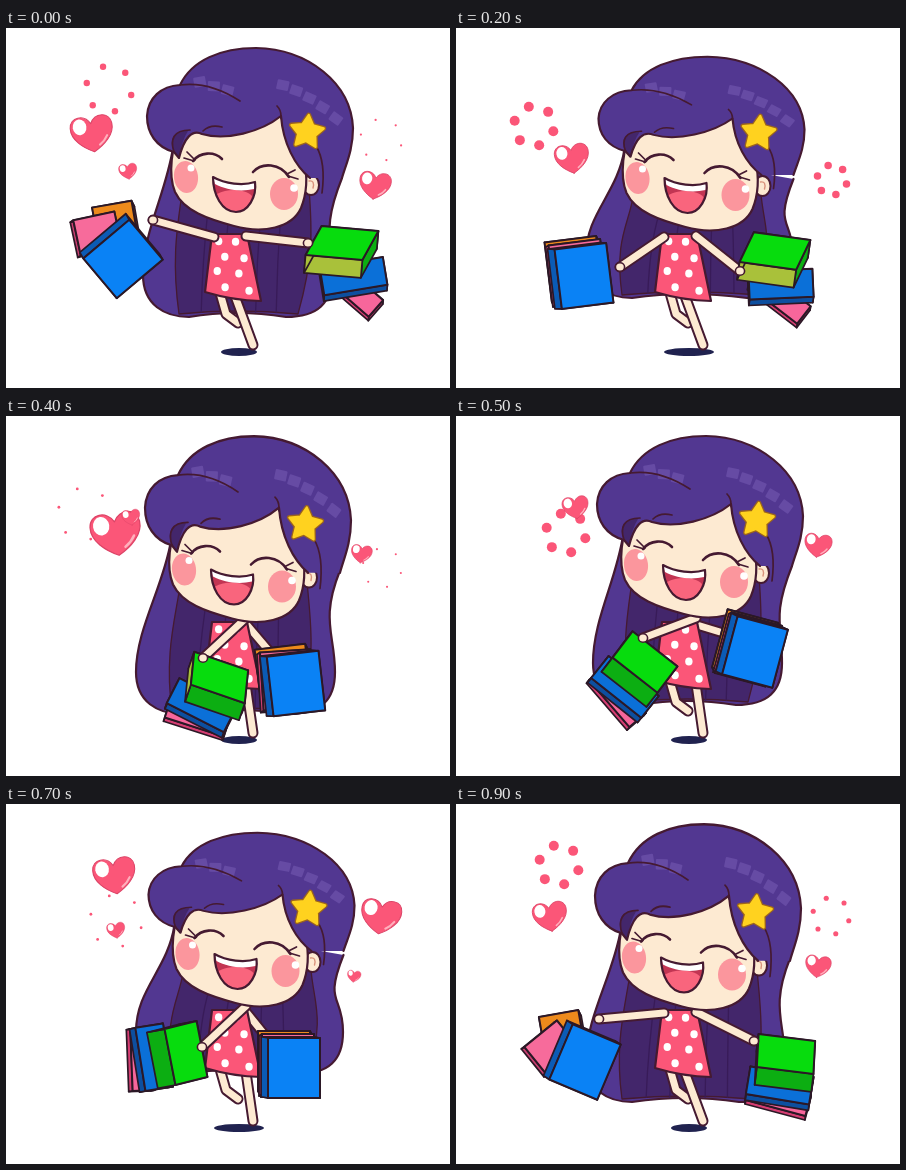
An HTML page that plays this animation: 444x360 px, repeating every 1 s.

```html
<!DOCTYPE html>
<html lang="en">
<head>
<meta charset="utf-8">
<title>Happy shopper</title>
<style>
html, body { margin: 0; width: 100%; height: 100%; overflow: hidden; background: #fff; }
svg { display: block; width: 100%; height: 100%; }
</style>
</head>
<body>
<svg id="stage" viewBox="0 0 444 360" stroke-linecap="round" stroke-linejoin="round"></svg>
<script>
const INK = '#451a31', HAIR = '#523791', DEEP = '#43266b', SKIN = '#fdead2', PINK = '#fb5678';
const STEP = 100, TICKS = 10;
const stage = document.getElementById('stage');

const path = (d, fill = 'none', stroke = INK, w = 2.2) =>
  `<path d="${d}" fill="${fill}" stroke="${stroke}" stroke-width="${w}"/>`;
const oval = (x, y, rx, ry, fill, extra = '') =>
  `<ellipse cx="${x}" cy="${y}" rx="${rx}" ry="${ry}" fill="${fill}" ${extra}/>`;
const group = (transform, body) => `<g transform="${transform}">${body}</g>`;
const line = pts => 'M' + pts.map(p => p.join()).join('L');
const add = ([x, y], [dx, dy], k = 1) => [x + dx * k, y + dy * k];
const polar = (r, deg) => [r * Math.cos(deg * Math.PI / 180), r * Math.sin(deg * Math.PI / 180)];
const range = n => [...Array(n).keys()];
const mix = (a, b, k = .5) => {
  if (typeof a === 'number') return a + (b - a) * k;
  if (Array.isArray(a)) return a.map((v, i) => mix(v, b[i], k));
  return Object.fromEntries(Object.keys(a).map(key => [key, mix(a[key], b[key], k)]));
};

// The body bounces once every five ticks.
const bounce = {
  x: [0, 1, 1.5, -1.5, -2],
  y: [0, 0, 1, 25, 4.5],
  crown: [1, .95, .91, 1.05, 1.05],
  left: [137, 134, 130, 117, 130],
  right: [326, 331, 337, 341, 329],
  bottom: [289, 277, 270, 290, 298]
};

// Arm key points: hands, the centre and turn of each bag stack, and how far stack a fans out.
const pose = (handA, handB, a, b, fan) => ({ handA, handB, a, b, fan });
const keys = {
  0: pose([147, 192], [302, 215], [117, 231, 50], [336, 215, 5], 1),
  2: pose([164, 239], [284, 243], [128, 248, -7], [319, 223, 8], 0),
  3: pose([263, 255], [207, 262], [281, 299, -28], [238, 277, 0], .2),
  5: pose([264, 216], [187, 222], [299, 236, 15], [189, 246, 38], 0),
  7: pose([262, 235], [196, 243], [288, 264, 0], [180, 249, 79], 0),
  8: pose([162, 258], [283, 264], [161, 299, 0], [301, 278, 2], 1),
  9: pose([143, 215], [298, 237], [129, 258, 23], [330, 250, 7], 1)
};
const poseAt = t => keys[t] || mix(keys[t - 1], keys[t + 1]);

// Hearts: first tick, start, drift per tick, size. Each grows, then bursts into a ring of dots.
const hearts = [
  [7, 110, 126, -8, -7, 1], [0, 122, 143, -3, -6.5, 1], [4, 125, 101, -5.5, -10, 1],
  [3, 349, 146, 6.5, -8.5, .8], [7, 348, 172, 7, -5, .75]
];

function heart([born, x0, y0, dx, dy, size], tick) {
  const age = (tick - born + TICKS) % TICKS, grown = Math.min(age, 4);
  const x = x0 + dx * grown, y = y0 + dy * grown;
  if (age > 7) return '';
  if (age > 4) return range(6).map(i => {
    const [cx, cy] = add([x, y], polar(size * (20 + 3 * (age - 5)), i * 60 - 105));
    const r = size * (5 - 1.8 * (age - 5));
    return oval(cx, cy, r, r, PINK);
  }).join('');
  return group(`translate(${x} ${y}) rotate(${Math.sign(dx) * 8}) scale(${size * (18 + 8 * age) / 40})`,
    path('M0,18C-10,13 -21,4 -20,-7C-19,-18 -5,-19 0,-9C5,-19 19,-18 20,-7C21,4 10,13 0,18Z', PINK, '#dc4467', 1) +
    oval(-11, -7, 6.5, 7.5, '#fff') +
    path('M14,4Q11,9 6,12', 'none', '#ffb0bd', 2));
}

const limb = pts => path(line(pts), 'none', INK, 11) + path(line(pts), 'none', SKIN, 7);

function backHair(L, R, B, dx, dy) {
  const x = v => v + dx, y = v => v + dy;
  const outer = `M${x(167)},${y(120)}C${x(160)},${y(165)} ${L},${B - 85} ${L},${B - 42}` +
    `C${L},${B - 12} ${L + 22},${B} ${L + 46},${B}Q230,${B - 8} ${R - 46},${B}` +
    `C${R - 14},${B} ${R},${B - 14} ${R},${B - 42}C${R},${B - 80} ${x(316)},${y(200)} ${x(336)},${y(150)}`;
  const inner = `M${x(176)},${y(165)}C${x(172)},${y(195)} ${L + 28},${B - 60} ${L + 36},${B - 3}` +
    `Q230,${B - 9} ${R - 34},${B - 3}C${R - 18},${B - 60} ${x(306)},${y(200)} ${x(303)},${y(160)}Z`;
  const strands = [.2, .38, .65, .82].map(k => {
    const top = x(178 + k * 118), end = mix(L + 34, R - 34, k);
    return path(`M${top},${y(185)}Q${mix(top, end, .8)},${B - 55} ${end},${B - 5}`, 'none', '#381b58', 1.3);
  }).join('');
  return path(outer, HAIR) + path(inner, DEEP, INK, 1.3) + strands;
}

function dress(drop) {
  const a = [206, 206 + drop], b = [241, 206 + drop];
  const c = [255 - drop * .3, 273 + drop * 1.3], d = [199, 264 + drop * 1.6];
  const spots = range(8).map(i => {
    const row = i >> 1, u = .2 + (i % 2) * .45 + (row % 2) * .16;
    const [x, y] = mix(mix(a, b, u), mix(d, c, u), .12 + row * .25);
    return oval(x, y, 3.7, 4, '#fff');
  }).join('');
  return path(`M${a}L${b}L${c}Q${(c[0] + d[0]) / 2},${(c[1] + d[1]) / 2 + 4} ${d}Z`, PINK) + spots;
}

// A box: a slanted front panel with its sides drawn toward "depth".
function box(center, [w, h], turn, face, sides, depth, lean = 0) {
  const u = polar(w / 2, turn), v = polar(h / 2, turn + 90 + lean);
  const front = [[-1, -1], [1, -1], [1, 1], [-1, 1]].map(([i, j]) => add(add(center, u, i), v, j));
  const walls = front.map((p, i) => {
    const next = front[(i + 1) % 4];
    return path(line([p, next, add(next, depth), add(p, depth)]) + 'Z', sides[i % sides.length], '#2b1826', 1.7);
  }).join('');
  return walls + path(line(front) + 'Z', face, '#2b1826', 2);
}

function stackA([x, y, turn], fan) {
  const at = (near, r, deg) => add([x, y], mix(near, polar(r, deg), fan));
  const out = 218 + turn * .8, size = [52, 60];
  return box(at([-10, -7], 44, out), mix(size, [40, 24], fan), mix(turn, -10, fan), '#ed8a1c', ['#a9611b'], [3, 6]) +
    box(at([-6, -4], 36, out - 33), mix(size, [36, 42], fan), turn + 28 * fan, '#f76b9b', ['#c93f70'], [-3, 2]) +
    box([x, y], size, turn, '#0a82f5', ['#0b5bb5'], polar(7, turn + 190));
}

function stackB([x, y, turn]) {
  const lean = (245 - y) * .8, down = turn + 90;
  const under = d => add(add([x, y], polar(d, down)), polar(lean * .6, turn));
  const olive = '#a9c13a', green = '#0cae12';
  return box(under(44), [62, 22], turn + 12 + lean, '#f7669b', ['#d63d72'], polar(4, down)) +
    box(under(32), [64, 28], turn - lean * .6, '#0b70d8', ['#0d4f9f'], polar(6, down)) +
    box([x, y], [57, 33], turn, '#07dc0d', [green, green, lean > 0 ? olive : green, olive], polar(18, down), lean);
}

const capOuter = 'M168,124C150,119 141,105 141,88C142,70 155,58 174,57C186,32 215,20 250,20C302,21 345,55 347,100C347,122 340,136 336,150';
const capFringe = '304,150C289,138 277,115 275,88C255,104 220,113 196,106C186,101 178,110 173,130L168,124';
const shine = (x, y, turn) => group(`translate(${x} ${y}) rotate(${turn})`,
  '<rect width="12" height="10" rx="1" fill="#664ba4"/>');
const cap = path(`${capOuter}L${capFringe}Z`, HAIR, 'none') +
  range(5).map(i => shine(272 + i * 14, 51 + i * 4 + i * i, 12 + i * 6)).join('') +
  range(3).map(i => shine(187 + i * 15, 50 + i * 3, i * 12 - 10)).join('') +
  path('M168,124C162,112 168,101 182,103Q176,112 173,130Z', DEEP, 'none') +
  path(capOuter) + path('M' + capFringe) +
  path('M174,57C196,54 217,62 234,73M168,124C164,112 167,102 184,102M197,103Q204,96 216,99M275,88Q275,82 271,78M310,118Q320,134 316,165', 'none', INK, 1.7);

const starPath = line(range(10).map(i => add([301, 104], polar(i % 2 ? 9 : 17, i * 36 - 84)))) + 'Z';
const star = path(starPath, '#ffd21f', '#9c641d', 5) + path(starPath, '#ffd21f', '#ffd21f', 2.4);

const lips = 'M207,149C219,156 237,158 249,154C251,169 242,184 230,184C216,184 207,167 207,149Z';
const face = oval(305, 157, 8, 10, SKIN, `stroke="${INK}" stroke-width="2"`) +
  path('M303,153Q309,152 307,160', 'none', '#d9937c', 1.4) +
  path('M176,96C165,118 162,147 169,164C178,183 202,191 228,198C257,206 286,200 295,180C301,165 302,150 298,132L272,84Z', SKIN) +
  oval(180, 149, 12, 16, '#fb969d', 'transform="rotate(-8 180 149)"') +
  oval(278, 166, 14, 16, '#fb969d') +
  oval(185, 140, 3.5, 3.5, '#fff') + oval(288, 160, 3.8, 3.8, '#fff') +
  path('M187,133C194,124 208,123 216,131M247,144C256,134 274,135 283,149', 'none', INK, 2.6) +
  path('M188,133L178,130M189,132L181,124M282,148L292,151M281,146L289,142', 'none', INK, 1.7) +
  path(lips, '#c23553', 'none') +
  path('M211,166C222,160 239,161 246,168C243,179 237,183 230,183C221,183 214,176 211,166Z', '#f9657d', 'none') +
  path('M207,149C219,156 237,158 249,154L248,161C235,164 220,162 209,156Z', '#fff', 'none') +
  path(lips);

const head = (dx, dy, crown) => group(`translate(${dx} ${dy})`,
  face + group(`translate(0 ${105 * (1 - crown)}) scale(1 ${crown})`, cap) + star);

function draw(tick) {
  const { handA, handB, a, b, fan } = poseAt(tick);
  const beat = Object.fromEntries(Object.entries(bounce).map(([k, v]) => [k, v[tick % 5]]));
  const crossed = tick > 2 && tick < 8;
  const drop = beat.y > 20 ? 22 : 0;
  const hip = crossed ? 240 : 229;
  const armA = limb([[crossed ? 241 : 208, 209 + drop], handA]);
  const armB = limb([[240, (crossed ? 202 : 208) + drop], handB]);
  const hand = p => oval(...p, 4.6, 4.3, SKIN, `stroke="${INK}" stroke-width="1.6"`);
  stage.innerHTML =
    hearts.map(h => heart(h, tick)).join('') +
    backHair(beat.left, beat.right, beat.bottom, beat.x, beat.y) +
    oval(233, 324, 18 + 7 * Math.sin(tick % 5 * Math.PI / 4) ** 2, 4, '#20224f') +
    limb([[214, 265 + drop], [220, 286 + drop], [232, 295 + drop]]) +
    limb([[hip, 268 + drop], [247, 317]]) +
    (crossed ? armA + dress(drop) : dress(drop) + armA) + armB +
    head(beat.x, beat.y, beat.crown) +
    stackA(a, fan) + stackB(b) + (crossed ? '' : hand(handA)) + hand(handB);
}

let shown = -1;
function frame() {
  const tick = Math.floor(performance.now() / STEP) % TICKS;
  if (tick !== shown) draw(shown = tick);
  requestAnimationFrame(frame);
}
frame();
</script>
</body>
</html>
```
